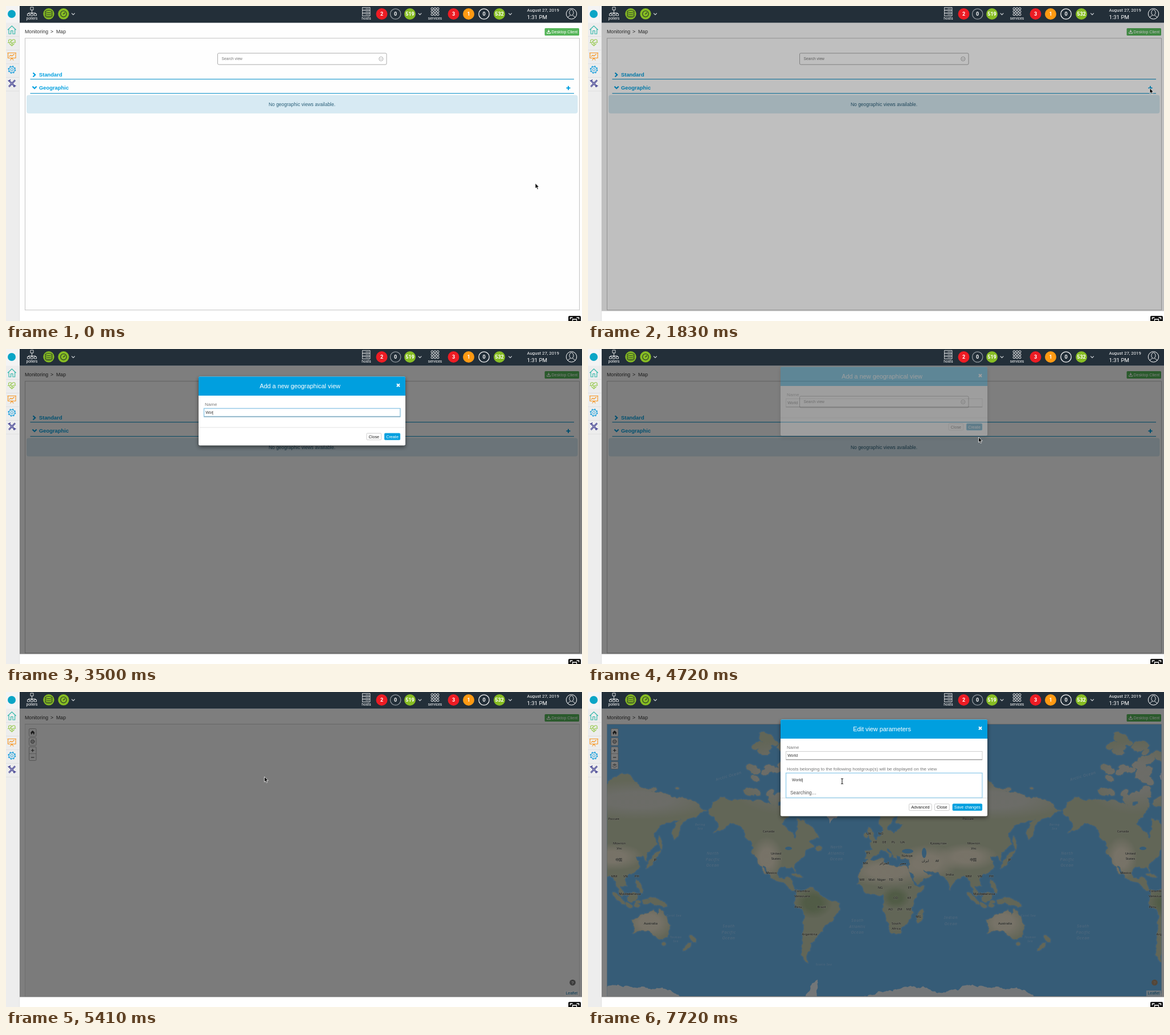
An HTML page for the animation above (8 s loop, 1011 by 554 pixels).

```html
<!DOCTYPE html>
<html lang="en">
<head>
<meta charset="utf-8">
<title>Create a geographic view</title>
<style>
html, body { margin: 0; width: 100%; height: 100%; overflow: hidden; background: #fff; }
svg { display: block; width: 100vw; height: 100vh; }
text { font-family: "Liberation Sans", Arial, sans-serif; }
.bar text { font-family: Roboto, sans-serif; fill: #fff; }
.map text { font-family: "Noto Sans", "Noto Sans CJK SC", "DejaVu Sans", sans-serif; text-anchor: middle; }
.sea { fill: #a8d4fa; font-style: italic; letter-spacing: .7px; }
.land { fill: #2c2c26; stroke: #f0f0e4; stroke-width: 1.1px; stroke-opacity: .6; paint-order: stroke; }
.mid { text-anchor: middle; }
</style>
</head>
<body>
<svg id="stage" viewBox="0 0 1011 554" preserveAspectRatio="none"></svg>
<script>
const LOOP = 8000;
const BLUE = '#009fdf';
const OCEAN = '#6cb9f0';
const WORLD = 622;

// ---- drawing helpers ----
const rect = (x, y, w, h, fill, more = '') =>
  `<rect x="${x}" y="${y}" width="${w}" height="${h}" fill="${fill}" ${more}/>`;
const line = (d, color, width = 1, more = '') =>
  `<path d="${d}" fill="none" stroke="${color}" stroke-width="${width}" ${more}/>`;
const shape = (d, fill, more = '') => `<path d="${d}" fill="${fill}" ${more}/>`;
const dot = (x, y, r, fill, more = '') => `<circle cx="${x}" cy="${y}" r="${r}" fill="${fill}" ${more}/>`;
const ring = (x, y, r, color, width = 1, more = '') => dot(x, y, r, 'none', `stroke="${color}" stroke-width="${width}" ${more}`);
const text = (x, y, size, fill, content, more = '') =>
  `<text x="${x}" y="${y}" font-size="${size}" fill="${fill}" ${more}>${content}</text>`;
const group = (id, content, more = '') => `<g id="${id}" ${more}>${content}</g>`;
const repeat = (n, draw) => Array.from({ length: n }, (_, i) => draw(i)).join('');

// ---- map: a few key points per coast, roughened by seeded midpoint displacement ----
let seed = 7;
const random = () => (seed = seed * 16807 % 2147483647) / 2147483647;
const vary = amount => (random() * 2 - 1) * amount;

const project = (lon, lat) => [
  502 + lon * WORLD / 360,
  362 - WORLD / (2 * Math.PI) * Math.log(Math.tan(Math.PI / 4 + lat * Math.PI / 360))
];
function roughen(a, b) {
  const dx = b[0] - a[0], dy = b[1] - a[1], length = Math.hypot(dx, dy);
  if (length < 3) return [a];
  const shift = vary(Math.min(.2, 4 / length));
  const mid = [(a[0] + b[0]) / 2 - dy * shift, (a[1] + b[1]) / 2 + dx * shift];
  return [...roughen(a, mid), ...roughen(mid, b)];
}
const outline = points => 'M' + points.flatMap((p, i) => roughen(p, points[(i + 1) % points.length]))
  .map(p => p.map(v => v.toFixed(1))).join('L') + 'Z';
const coast = list => outline(list.split(' ').map(p => project(...p.split(',').map(Number))));

function island(x, y, length, width, degrees) {
  const turn = degrees * Math.PI / 180;
  return outline(Array.from({ length: 8 }, (_, i) => {
    const u = Math.cos(i * Math.PI / 4) * length / 2, v = Math.sin(i * Math.PI / 4) * width / 2;
    return [x + u * Math.cos(turn) - v * Math.sin(turn), y + u * Math.sin(turn) + v * Math.cos(turn)];
  }));
}
const archipelago = (x, y, spreadX, spreadY, count, size) => repeat(count, () => {
  const length = size * (.6 + random());
  return island(x + vary(spreadX), y + vary(spreadY), length, length * .55, vary(50));
});

const northAmerica = coast('-168,66 -156,71 -128,70 -95,68 -85,69.5 -82,67 -94,60 -82,54 -80,51.5 -77,57 -78,62.5 -65,59 -56,52 -66,50 -61,46 -70,43 -76,36 -81,31 -80,25.5 -84,30 -97,28 -97,20 -91,18.5 -88,21 -83,14 -80,8 -94,16 -105,20 -113,31 -110,23.5 -118,34 -124,41 -124,49 -135,58.5 -146,60.5 -163,55 -158,58');
const southAmerica = coast('-79,8 -62,10.5 -50,0 -35,-6 -39,-17 -48,-26 -58,-37 -65,-42 -69,-51 -67,-55 -74,-50 -71,-30 -70,-18 -81,-6');
const africa = coast('-6,36 10,37 11,33 32,31 37,21 43,12 51,12 40,-4 40,-15 35,-22 27,-34 18,-34 12,-17 9,4 -8,4.5 -17,14 -13,28');
const eurasia = coast('-9,37 -9,43 -1,44 -4,48.5 8,54 10,57 20,54.5 30,60 22,60.5 25,65.5 17,60 13,55.5 5,60 14,68 25,71 41,67 69,69 73,73 104,77.5 140,72.5 180,69 190,66 163,58 157,51 156,57 164,62.5 142,59 136,54.5 140,48 129,42 129,35 125,39.5 118,39 122,30 108,20.5 109,12 102,12 104,1.5 98,16 91,22 80,14 77,8 72,20 66,25 57,26 48,30 52,25 59,22.5 44,13 35,28 36,36.5 27,37 23,40 23,36.5 13,45 18,40 16,38 8,44 0,39.5 -5,36');
const australia = coast('114,-22 115,-34 131,-31.5 140,-38 150,-37 153,-27 142,-11 140,-17.5 136,-12 122,-18');
const britain = island(497, 251, 27, 9, 70) + island(488, 252, 9, 7, 70);
const japan = island(737, 294, 42, 6, -52) + island(749, 265, 24, 4, 80);
const malaya = island(700, 361, 20, 16, -45) + island(676, 363, 30, 8, 45) + island(744, 370, 36, 11, 22) +
  island(712, 342, 26, 8, 65) + archipelago(710, 372, 22, 4, 8, 8);
const newZealand = island(806, 434, 16, 7, 50) + island(796, 448, 20, 6, -45);
const atlantic = island(367, 323, 20, 4, 15) + island(405, 275, 11, 9, 0) + island(469, 210, 18, 11, 0);
const arctic = archipelago(345, 138, 72, 62, 36, 22) + archipelago(765, 166, 35, 8, 4, 8);
const landPath = northAmerica + southAmerica + africa + eurasia + australia + britain + japan + malaya +
  newZealand + atlantic + arctic + island(583, 394, 26, 9, -70) + island(755, 443, 7, 6, 0);
const icePath = coast('-45,60 -54,70 -70,77 -35,83.5 -20,78 -24,70') +
  coast('-75,-74 -57,-63.3 -60,-74 0,-69.8 50,-66.5 70,-69 100,-65.8 145,-67 170,-72 170,-80 -75,-80');

const tintColors = { sand: '#f7ebd6', forest: '#9db587', snow: '#dcdcd6' };
const tintDefs = Object.entries(tintColors).map(([id, color]) =>
  `<radialGradient id="${id}"><stop offset=".4" stop-color="${color}" stop-opacity=".85"/>` +
  `<stop offset="1" stop-color="${color}" stop-opacity="0"/></radialGradient>`).join('');
const oval = (fill, x, y, rx, ry) => `<ellipse cx="${x}" cy="${y}" rx="${rx}" ry="${ry}" fill="${fill}"/>`;
const tint = (id, ...place) => oval(`url(#${id})`, ...place);
const tints = tint('sand', 525, 315, 75, 28) + tint('sand', 595, 300, 55, 32) + tint('sand', 665, 290, 55, 24) +
  tint('sand', 730, 405, 42, 32) + tint('sand', 314, 292, 28, 38) +
  tint('snow', 338, 150, 95, 65) + tint('snow', 710, 190, 140, 34) +
  tint('forest', 395, 371, 34, 28) + tint('forest', 540, 362, 26, 20);

// Each word stands one step right of the last; "|" stacks lines.
const labels = (kind, size, x, y, words, step = 0) => words.split(' ').map((word, i) =>
  word.split('|').map((part, row) =>
    text(x + i * step, y + row * size * 1.5, size, '', part.replace('_', ' '), `class="${kind}"`)).join('')).join('');
const country = (...place) => labels('land', 5.8, ...place);
const ocean = (...place) => labels('sea', 7, ...place);
const sea = (...place) => labels('sea', 4.8, ...place);

const names = country(317, 247, 'Canada') + country(330, 286, 'United|States') + country(322, 320, 'Mexico') +
  country(376, 352, 'Colombia|Venezuela') + country(369, 380, 'Peru Brazil', 41) + country(389, 428, 'Argentina') +
  country(493, 251, 'UK NO', 21) + country(504, 266, 'FR DE PL UA', 16) + country(492, 285, 'ES') +
  country(560, 290, 'Türkiye') + country(615, 268, 'Қазақстан Монгол|Улс', 62) + country(667, 225, 'Россия') +
  country(592, 299, 'ایران AF', 21) + country(635, 323, 'India') + country(676, 297, '中国 JP', 64) +
  country(487, 303, 'MA الجزائر مصر', 33) + country(481, 332, 'MR Mali Niger TD SD', 17) +
  country(513, 346, 'NG ET', 52) + country(540, 364, 'CD KE', 24) + country(531, 384, 'AO ZM MZ', 16) +
  country(541, 409, 'South|Africa') + country(580, 397, 'MG') + country(732, 409, 'Australia') +
  country(688, 357, 'Malaysia Indonesia', 13) + country(668, 326, 'MM VN PH', 20) +
  ocean(219, 286, 'North|Pacific|Ocean') + ocean(247, 414, 'South|Pacific|Ocean') +
  ocean(436, 275, 'North|Atlantic|Ocean') + ocean(473, 404, 'South|Atlantic|Ocean') + ocean(637, 399, 'Indian|Ocean') +
  sea(197, 235, 'Bering|Sea') + sea(773, 395, 'Coral_Sea') + sea(776, 433, 'Tasman|Sea') + sea(414, 481, 'Scotia_Sea') +
  `<g transform="rotate(-16 247 148)">${ocean(247, 150, 'Arctic_Ocean')}</g>`;

const world = group('world',
  line(landPath, '#8fc9f3', 4, 'stroke-linejoin="round" opacity=".4"') +
  shape(landPath, '#c6cdb0', 'stroke="#c6cdb0" stroke-width=".6"') +
  `<g clip-path="url(#landClip)">${tints}</g>` +
  shape(icePath, '#e8eef2') +
  oval(OCEAN, 561, 280, 10, 4) + oval(OCEAN, 590, 283, 4, 9) + oval(OCEAN, 352, 275, 6, 3) +
  names);
const map = group('map', rect(33, 57, 974, 478, OCEAN) + world +
  [-WORLD, WORLD].map(x => `<use href="#world" x="${x}"/>`).join(''), 'class="map" clip-path="url(#mapClip)"');

// ---- page ----
const count = (x, value, fill) =>
  (fill ? dot(x, 14, 10, fill) : ring(x, 14, 9.2, x < 700 ? '#8d959b' : '#f4f4f4', 1.3)) +
  text(x, 17.3, 9, '#fff', value, 'class="mid" font-weight="700"');
const chevron = x => line(`M${x - 2.8} 12.7l2.8 2.8 2.8-2.8`, '#d8dcdf', 1.1);
const caption = (x, word) => text(x, 24.2, 6.6, '#fff', word, 'class="mid"');

const topBar = group('bar',
  rect(24, 0, 987, 29.5, '#232f39') +
  line('M45.5 7v6.500M39.5 14v-2h12v2M43 2h5v5h-5z', '#fff', .8) +
  repeat(3, i => line(`M${37.5 + i * 6} 13.5h4v3.5h-4z`, '#fff', .8)) +
  dot(75, 13.8, 9.7, '#87bd23') + dot(101, 13.8, 9.7, '#87bd23') +
  repeat(3, i => line(`M69 ${9.5 + i * 3.3}a6 2 0 0 0 12 0`, '#26352a', .9)) +
  line('M69 18v-8.500a6 2 0 0 1 12 0v8.500a6 2 0 0 1-12 0', '#26352a', .9) +
  ring(101, 13.8, 5.3, '#26352a', 1.1) + line('M100.5 14.5l3-3', '#26352a', 1.3) +
  [118, 726.5, 885].map(chevron).join('') +
  repeat(3, i => line(`M625.5 ${2.5 + i * 5}h13.5v5h-13.5zm2 2.5h1.2m2 0h7`, '#fff', .8)) +
  repeat(9, i => ring(748 + i % 3 * 5, 4.8 + Math.floor(i / 3) * 5, 2, '#fff', .9)) +
  caption(45.5, 'pollers') + caption(632.5, 'hosts') + caption(753, 'services') +
  count(659.5, 2, '#ed1c24') + count(683.7, 0) + count(709, 519, '#87bd23') +
  count(785.5, 3, '#ed1c24') + count(812, 1, '#ff9a13') + count(839, 0) + count(866, 532, '#87bd23') +
  text(914.5, 10.3, 7.8, '#fff', 'August 27, 2019') + text(914.5, 23, 9.6, '#fff', '1:31 PM') +
  ring(992.5, 13.8, 9.2, '#fff') + `<ellipse cx="992.500" cy="11.500" rx="3.600" ry="5" fill="none" stroke="#fff" stroke-width=".9"/>` +
  line('M986 20q2-2.500 4.500-3.500M999 20q-2-2.500-4.500-3.500', '#fff', .9), 'class="bar"');

const gear = (x, y, r, color) => ring(x, y, r * .82, color, r * .18) + ring(x, y, r * .36, color, r * .16) +
  ring(x, y, r, color, r * .25, `stroke-dasharray="${r * Math.PI / 8}"`);
const sideBar = rect(0, 0, 24, 554, '#ededed') + rect(0, 0, 24, 29.5, '#f4f4f4') + dot(10, 14, 7, '#0aa5c6') +
  line('M23.5 30V554', '#dedede', .8) + repeat(5, i => line(`M0 ${53.5 + i * 24}h23`, '#dedede', .8)) +
  line('M3 42l7.300-7 7.300 7M5 41v8h3.600v-5.500h3.400v5.500h3.600v-8', '#2cb5a8', 1.1) +
  line('M5 63.500q-1.500-4 1.500-4.500 2.600-.400 3.800 2 1.200-2.400 3.800-2 3 .500 1.500 4.500M6 66l4.300 4 4.300-4M3 64.500h4l1.500-2.500 2 5 1.700-3h5', '#8fc640', 1.1) +
  line('M3.500 82.500h13.500v9h-13.500zM2.500 82.500h15.500M7.500 95.500l2.800-4 2.800 4M5.500 89l3-2.500 2 1.500 4-3.500', '#f7941d', 1.1) +
  gear(10.3, 112, 6.2, '#1c9fdb') +
  line('M5 131l11 11M16 130.500l-11 11.500', '#37368c', 2.6) + line('M5 131l11 11M16 130.500l-11 11.500', '#ededed', .8) +
  line('M3.500 131a2.500 2.500 0 0 0 4-2M13.500 142.500a2.500 2.500 0 0 1 4-2', '#37368c', 1.1);

const corner = rect(987, 545, 22, 12, '#111', 'rx="2"') +
  line('M990.5 551v-3h4M1005.5 551v-3h-4M994.5 555v-4h7v4', '#fff', 1.3);

const listView = group('list',
  rect(371.5, 83, 296.5, 20, '#fff', 'rx="2" stroke="#aaa"') + text(378.5, 95.3, 6.7, '#777', 'Search view') +
  ring(658.3, 93, 3.6, '#999', .8) + line('M656.8 92.5l1.500 1.500 1.500-1.500', '#888', .8) +
  line('M47.5 117.5l3.700 3.500-3.700 3.500M46.5 141.5l3.600 3.500 3.600-3.500', BLUE, 2.2) +
  text(58, 124.4, 9.4, BLUE, 'Standard', 'font-weight="700"') +
  text(58, 147.4, 9.4, BLUE, 'Geographic', 'font-weight="700"') +
  line('M42.5 128.7H997M42.5 153.7H997', '#2a9fd0', 1.2) +
  rect(981, 138, 12.5, 13, '#dedede', 'rx="1" id="hover"') +
  line('M983.5 144.2h7M987 140.700v7', BLUE, 2) +
  rect(36.5, 157, 966.5, 31.5, '#d7eaf3', 'rx="3" stroke="#cfe6ef" stroke-width=".6"') +
  text(519.5, 176, 8.5, '#2b6079', 'No geographic views available.', 'class="mid"'));

const control = (y, h) => rect(40.5, y, 12.5, h, '#f4f4f4', 'rx="1.500" stroke="#9a9a9a" stroke-width=".8"');
const mapView = group('mapView',
  rect(33.5, 57, 973, 478, '#f8f8f8') + map +
  control(64.5, 13.5) + control(80.5, 13.5) + control(96.5, 24) + line('M40.5 108.5h12.500', '#aaa', .8) +
  shape('M42.700 71.500l4-3.700 4 3.700h-1v3h-2v-2.300h-2v2.300h-2v-3z', '#333') + gear(46.7, 87.2, 3.4, '#333') +
  line('M43.900 102.800h5.600M46.700 100v5.600M43.900 115h5.600', '#333', 1.1) +
  group('layers', control(122.5, 13) + shape('M42.5 128l4.200-2.300 4.200 2.300-4.200 2.300z', '#999') +
    line('M42.5 130.5l4.200 2.300 4.200-2.300', '#888')) +
  dot(994.5, 511, 5.3, '#777', 'id="help"') + text(994.5, 514, 8, '#f0f0f0', '?', 'class="mid" id="helpMark" font-weight="700"') +
  rect(980, 525, 26, 10, '#fff', 'opacity=".7"') + text(982.5, 532.4, 6.9, '#0a70a8', 'Leaflet'));

const page = rect(24, 29.5, 987, 507, '#fefefe') + text(33, 47.5, 8.8, '#333', 'Monitoring') +
  text(78, 47.5, 8.8, '#333', '&gt;') + text(88, 47.5, 8.8, '#333', 'Map') +
  rect(945.5, 39, 60.5, 13, '#55b559', 'rx="1.500"') +
  line('M952.5 41.800v4M950.700 44.200l1.800 1.800 1.800-1.800M949.700 46v2.200h5.600v-2.200', '#fff', 1.1) +
  text(957.5, 48, 7.05, '#fff', 'Desktop Client') +
  rect(33.5, 56.7, 973, 478, 'none', 'stroke="#bdbdbd" stroke-width=".9"') + listView + mapView;

// ---- dialogs ----
const button = (x, y, w, word, primary, id = '') =>
  rect(x, y, w, 11.6, primary ? BLUE : '#fff', `rx="1.500" stroke="${primary ? BLUE : '#bbb'}" stroke-width=".7" ${id}`) +
  text(x + w / 2, y + 8.4, 7.25, primary ? '#fff' : '#222', word, 'class="mid"');
const input = (y, h) => rect(347.5, y, 344.5, h, '#fff', 'stroke="#c4c4c4" stroke-width=".8"') +
  line(`M347.5 ${y + h}h344.5`, '#888');
const focusRing = (id, y, h) =>
  rect(347.5, y, 344.5, h, 'none', `id="${id}" stroke="#7cc0e6" stroke-width=".8" filter="url(#glow)"`);
const divider = y => line(`M338 ${y}h363`, '#e2e2e2');
const panel = (id, y, h, title) =>
  rect(338, y, 363, h, '#fff', `rx="2.500" filter="url(#shadow)" id="${id}"`) +
  shape(`M338 ${y + 33.5}v-31.500q0-2 2-2h359q2 0 2 2v31.500z`, BLUE) +
  text(516, y + 20.4, 10.9, '#fff', title, 'class="mid"') +
  line(`M686 ${y + 12.7}l5 5m0-5l-5 5`, '#fff', 2) +
  text(349, y + 51.8, 8, '#777', 'Name') + input(y + 56, 14.5);

const createDialog = group('createDialog',
  panel('createPanel', 40, 121, 'Add a new geographical view') + focusRing('nameFocus', 96, 14.5) + divider(129.5) +
  button(633, 139.7, 25.7, 'Close') + button(664.4, 139.7, 27.3, 'Create', true, 'id="create"') +
  text(350.2, 105.3, 6.9, '#333', '', 'id="nameText"'));

const editDialog = group('editDialog',
  panel('editPanel', 48.5, 165, 'Edit view parameters') + text(350.2, 114.2, 6.9, '#333', 'World') +
  text(349, 138.4, 8, '#777', 'Hosts belonging to the following hostgroup(s) will be displayed on the view') +
  group('editFooter', divider(181.5) + button(563.5, 192, 39.7, 'Advanced') +
    button(608.5, 192, 25.7, 'Close') + button(640, 192, 51.7, 'Save changes', true)) +
  group('closedField', input(142.5, 20.5)) +
  group('openField', rect(347.5, 142.5, 344.5, 43.5, '#fff') + focusRing('hostFocus', 142.5, 43.5) +
    text(358, 156.8, 6.9, '#333', '', 'id="hostText"') + text(355, 179.7, 8.4, '#555', 'Searching…')));

const pointers = group('arrow', shape('M0 0v9.200l2.100-1.900 1.500 3.300 1.700-.700-1.500-3.200h2.900z', '#000', 'stroke="#fff" stroke-width=".8"')) +
  group('ibeam', line('M-2-4.800q2 0 2 1.200 0-1.200 2-1.200M0-3.600v7.200M-2 4.800q2 0 2-1.200 0 1.200 2 1.200', '#222', 1.1));

const stage = document.getElementById('stage');
stage.innerHTML = `<defs>${tintDefs}
  <clipPath id="landClip"><path d="${landPath}"/></clipPath>
  <clipPath id="mapClip"><rect x="33.5" y="57" width="973" height="478"/></clipPath>
  <filter id="shadow" x="-10%" y="-20%" width="120%" height="150%"><feDropShadow dx="0" dy="3" stdDeviation="3.500" flood-opacity=".5"/></filter>
  <filter id="glow" x="-2%" y="-30%" width="104%" height="160%"><feDropShadow dx="0" dy="0" stdDeviation="1.500" flood-color="#66bbe8" flood-opacity=".5"/></filter>
  </defs>` + rect(0, 0, 1011, 554, '#fff') + page + rect(24, 29.5, 987, 507, '#000', 'id="backdrop"') +
  sideBar + topBar + createDialog + editDialog + corner + pointers;

// ---- timeline: each entry holds until the next ----
const dim = [[0, 0], [1830, .25], [2100, .5], [5020, 0], [5410, .5]];
const dialogState = [[0, 0, 0], [2100, 1, 0], [2520, 1, 8.5], [4720, .25, -8.5], [5020, 0, 0]];
const pointerStops = [[2100, 'ibeam', 628, 117], [3030, ''], [3910, 'arrow', 640, 158], [4150, 'arrow', 685.5, 155],
  [5020, 'arrow', 560, 151], [5410, 'arrow', 453.5, 149], [6400, 'ibeam', 446, 157]];

const at = (keys, t) => keys.findLast(key => t >= key[0]);
const between = (t, from, to) => t >= from && t < to;
const typed = (t, start, pace) => 'World'.slice(0, Math.max(0, 1 + Math.floor((t - start) / pace)));

// The first move runs evenly to the plus sign, shown in held steps.
function pointerAt(t) {
  if (t >= 2100) return at(pointerStops, t).slice(1);
  const held = t < 600 ? 0 : t < 960 ? 600 : 960 + Math.floor((t - 960) / 215) * 215;
  const p = Math.min(1, Math.max(0, (held - 300) / 1080));
  return ['arrow', 929 + 57 * p * (1.6 - .6 * p), 311.8 - 167.3 * p];
}

const $ = id => document.getElementById(id);
const show = (id, on) => $(id).setAttribute('display', on ? 'inline' : 'none');
const set = (id, name, value) => $(id).setAttribute(name, value);

function render(t) {
  const caret = '<tspan font-size="7.500" dx="-.6">|</tspan>';
  const mapLoaded = t >= 6010, hostOpen = t >= 6880, nameFocused = between(t, 3030, 4150);

  set('backdrop', 'opacity', at(dim, t)[1]);
  show('list', t < 5020);
  show('mapView', t >= 5020);
  show('map', mapLoaded);
  show('layers', mapLoaded);
  set('help', 'fill', mapLoaded ? '#a98d70' : '#777');
  set('helpMark', 'opacity', mapLoaded ? .3 : 1);
  show('hover', between(t, 1390, 1830));

  const [, alpha, top] = at(dialogState, t);
  show('createDialog', alpha > 0);
  set('createDialog', 'opacity', alpha);
  set('createDialog', 'transform', `translate(0 ${top})`);
  $('nameText').innerHTML = typed(t, 3030, 220) + (nameFocused ? caret : '');
  show('nameFocus', nameFocused);
  set('create', 'fill', between(t, 4420, 5020) ? '#0a78ad' : BLUE);

  show('editDialog', mapLoaded);
  show('closedField', !hostOpen);
  show('openField', hostOpen);
  set('editPanel', 'height', hostOpen ? 169.8 : 165);
  set('editFooter', 'transform', `translate(0 ${hostOpen ? 4.8 : 0})`);
  $('hostText').innerHTML = typed(t, 6880, 210) + caret;

  const [kind, x, y] = pointerAt(t);
  for (const id of ['arrow', 'ibeam']) show(id, id === kind);
  if (kind) set(kind, 'transform', `translate(${x} ${y})`);
}

const start = performance.now();
function tick() {
  render((performance.now() - start) % LOOP);
  requestAnimationFrame(tick);
}
tick();
</script>
</body>
</html>
```
